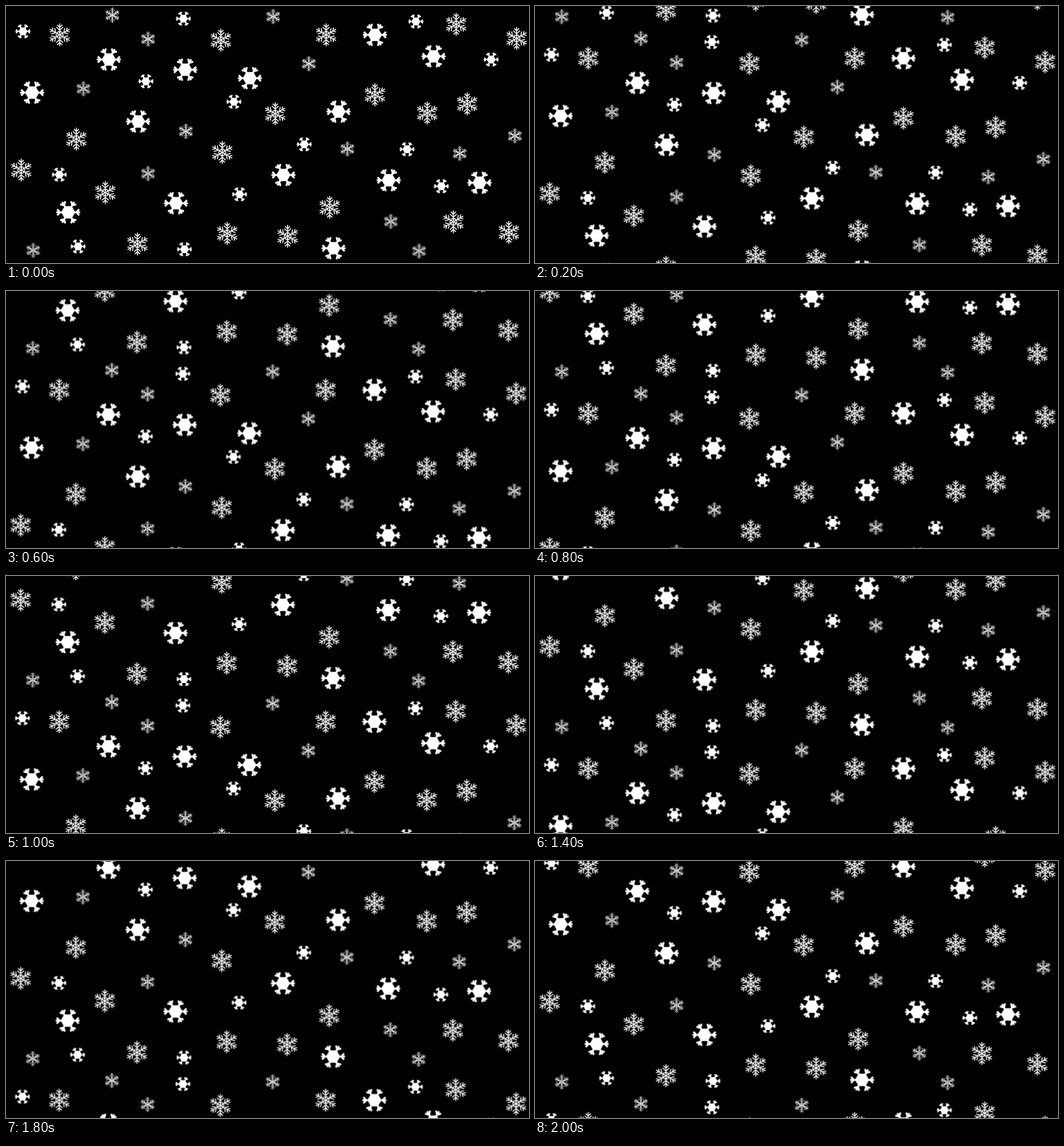
An HTML page for the animation above (2200 ms loop, 740x365 px).

```html
<!DOCTYPE html>
<html lang="en">
<head>
<meta charset="utf-8">
<title>Snowfall</title>
<style>
  html, body { margin: 0; width: 100%; height: 100%; overflow: hidden; background: #000; }
  svg { display: block; width: 740px; height: 365px; }
  #sway { animation: sway 2200ms step-end infinite; }
  #fall { animation: fall 2200ms steps(11) infinite; }
  @keyframes sway { 0% { transform: none; } 9.0909%, 100% { transform: translateX(-0.7px); } }
  @keyframes fall { to { transform: translateY(365px); } }
</style>
</head>
<body>
<svg viewBox="0 0 740 365" fill="none" stroke="#fff">
  <defs>
    <path id="solidArm" d="M0 0H17M15.6 -4.2L11.5 0L15.6 4.2" stroke-width="2.7"/>
    <path id="lacyArm" d="M0 0V-16.2M-3.6 -14.3L0 -10.8L3.6 -14.3M-4.8 -11L0 -6.6L4.8 -11M-2.2 -5.2L0 -3.2L2.2 -5.2" stroke-width="1.35"/>
    <g id="solid"><path d="M10 0L5 8.66H-5L-10 0L-5 -8.66H5Z" fill="#fff" stroke="none"/></g>
    <g id="lacy"></g>
    <g id="flakes"></g>
  </defs>
  <g id="sway">
    <g id="fall">
      <use href="#flakes"/>
      <use href="#flakes" y="-365"/>
    </g>
  </g>
</svg>
<script>
  const byId = id => document.getElementById(id);

  function addUse(parent, shape, transform) {
    const use = document.createElementNS("http://www.w3.org/2000/svg", "use");
    use.setAttribute("href", "#" + shape);
    use.setAttribute("transform", transform);
    byId(parent).append(use);
  }

  for (let angle = 0; angle < 360; angle += 60) {
    addUse("solid", "solidArm", `rotate(${angle})`);
    addUse("lacy", "lacyArm", `rotate(${angle})`);
  }

  // Each entry of spots is an "x,y" centre.
  const groups = [
    { shape: "solid", scale: 1, spots: "145.5,76 253.5,90.5 345,102.5 522,41 605,71.5 37,123 187,164 470.5,150 392.5,240 541.5,247.5 670,251 88,293 240.5,280 463.5,344" },
    { shape: "solid", scale: 0.63, spots: "24,36 251,18 198,107 322.5,136 580,22 686.5,76 422,196.5 567.5,203.5 75.5,239.5 330.5,267.5 616,256 102,341.5 252.5,345.5" },
    { shape: "lacy", scale: 1, spots: "76,41 304,48.5 453,41 637,26 722.5,46 381,153 522,126 596,152 652.5,139 99.5,189 306,208 21.5,233 140.5,265 458,286 313,323 398.5,327 633,306.5 711.5,321.5 186,338" },
    { shape: "lacy", scale: 0.67, spots: "150.5,13 201,47 378,15 428.5,82 109.5,117.5 254.5,178 483,203 642,209.5 720,184.5 201,238 544.5,306 38.5,347 584.5,348" }
  ];

  for (const { shape, scale, spots } of groups)
    for (const spot of spots.split(" "))
      addUse("flakes", shape, `translate(${spot}) scale(${scale})`);
</script>
</body>
</html>
```
